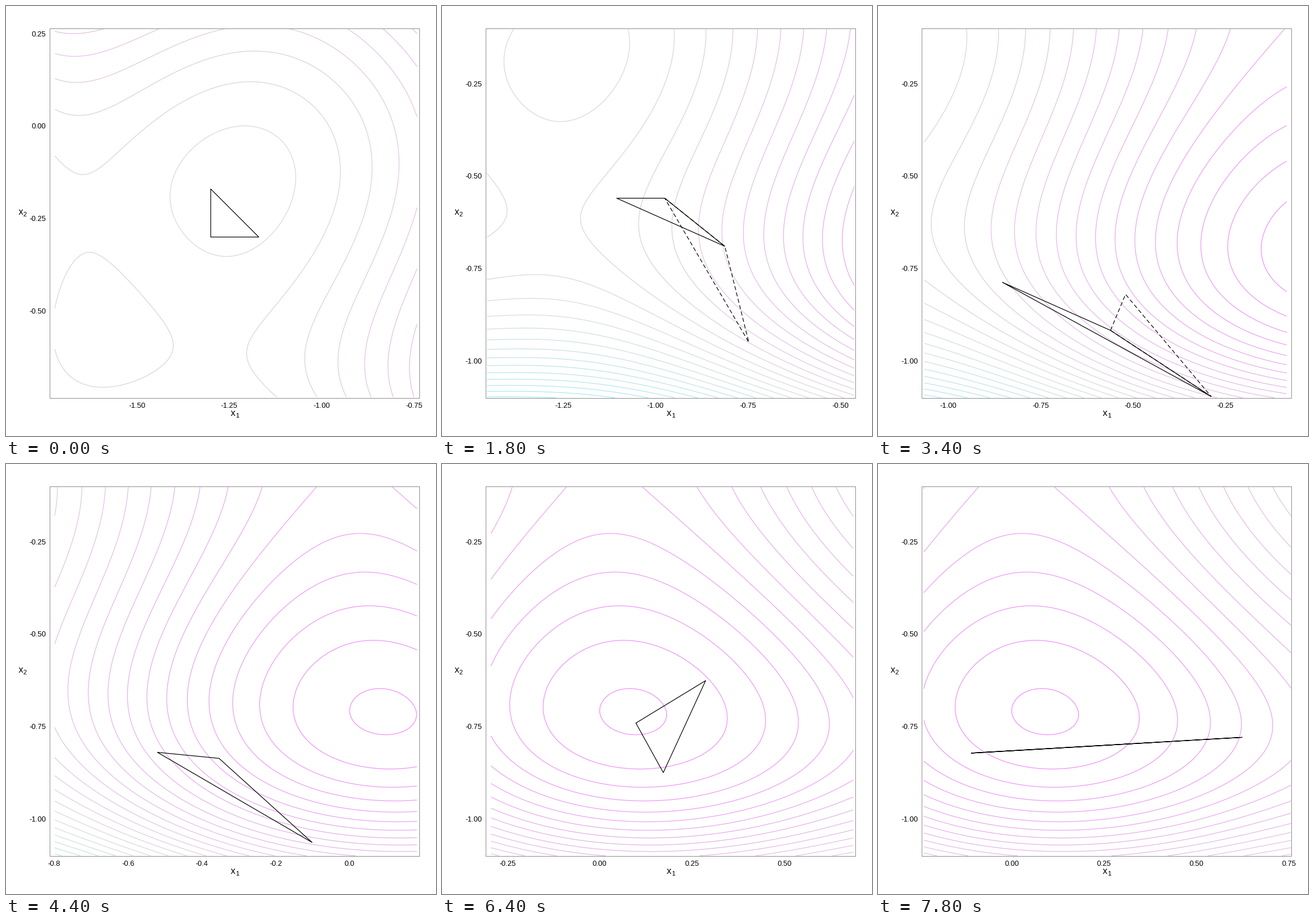
Animation, 748 px wide and 748 px high, one loop 8 s. Source, as a matplotlib script:

```python
import math

import matplotlib.pyplot as plt
import numpy as np
from matplotlib.animation import FuncAnimation

SIZE, DPI = 748, 100
PX = 72 / DPI                       # one pixel in points
LEFT, RIGHT, TOP, BOTTOM = 76.45, 719.4, 38.6, 681.6
FRAMES, INTERVAL = 40, 200
plt.rcParams["font.family"] = "Liberation Sans"


def camel(x, y):
    """Six-hump camel function."""
    return 4 * x**2 - 2.1 * x**4 + x**6 / 3 + x * y - 4 * y**2 + 4 * y**4


def nelder_mead(start, count):
    """Return the first `count` points the simplex search evaluates."""
    step = 0.1 * np.abs(start).max()
    simplex = [start, start + [step, 0], start + [0, step]]
    trail = list(simplex)
    vals = [camel(*p) for p in simplex]

    def visit(p):
        trail.append(p)
        return camel(*p)

    while len(trail) < count:
        hi = int(np.argmax(vals))
        low = min(vals)
        mid = (sum(simplex) - simplex[hi]) / 2
        new = 2 * mid - simplex[hi]
        val = visit(new)
        if val < low:
            trial = 2 * new - mid
            trial_val = visit(trial)
            if trial_val < val:
                new, val = trial, trial_val
            simplex[hi], vals[hi] = new, val
        else:
            if val < vals[hi]:
                simplex[hi], vals[hi] = new, val
            trial = (simplex[hi] + mid) / 2
            trial_val = visit(trial)
            if trial_val < vals[hi]:
                simplex[hi], vals[hi] = trial, trial_val
    return np.array(trail[:count])


def nice_breaks(lo, hi, want=5):
    """Extended Wilkinson tick search; returns visible ticks and decimals."""
    best, found = -9, None
    for rank, q in enumerate((1, 5, 2, 2.5, 4, 3)):
        for power in (-2, -1, 0):
            step = q * 10.0**power
            for k in range(2, 13):
                first = math.floor(hi / step) - (k - 1)
                for s in range(first, math.ceil(lo / step) + 1):
                    a, b = s * step, (s + k - 1) * step
                    zero = s <= 0 <= s + k - 1
                    simple = zero - rank / 5
                    cover = 1 - 50 * ((hi - b)**2 + (lo - a)**2) / (hi - lo)**2
                    ratio = (max(b, hi) - min(a, lo)) / (step * (want - 1))
                    dense = 2 - max(ratio, 1 / ratio)
                    score = 0.25 * simple + 0.2 * cover + 0.5 * dense
                    if score > best:
                        best, found = score, (s, k, step)
    s, k, step = found
    ticks = [i * step for i in range(s, s + k) if lo <= i * step <= hi]
    decimals = 1 if abs(step * 10 - round(step * 10)) < 1e-6 else 2
    return ticks, decimals


def level_color(v):
    stops = [-1, 2.6, 4.8, 8.8]
    rgb = [(240, 140, 250), (218, 218, 218), (165, 235, 242), (110, 240, 250)]
    return tuple(np.interp(v, stops, ch) / 255 for ch in zip(*rgb))


trail = nelder_mead(np.array([-1.3, -0.3]), FRAMES // 2 + 3)
gx = np.linspace(-2.1, 2.1, 301)
gy = np.linspace(-1.1, 1.1, 301)
levels = np.arange(-5, 44) / 5
colors = [level_color(v) for v in levels]

fig = plt.figure(figsize=(SIZE / DPI, SIZE / DPI), dpi=DPI, facecolor="white")
ax = fig.add_axes([LEFT / SIZE, 1 - BOTTOM / SIZE,
                   (RIGHT - LEFT) / SIZE, (BOTTOM - TOP) / SIZE])


def label(x, y, text, size, ha="left"):
    ax.text(x / SIZE, 1 - y / SIZE, text, fontsize=size * PX, ha=ha,
            va="baseline", color="black", transform=fig.transFigure)


def inside(grid, lo, hi):
    return grid[(grid >= lo - 1e-9) & (grid <= hi + 1e-9)]


def draw(frame):
    k = frame // 2
    tri = trail[k:k + 3]
    cx, cy = (tri.min(axis=0) + tri.max(axis=0)) / 2
    cy = max(cy, -0.6)
    x0, x1, y0, y1 = cx - 0.5, cx + 0.5, cy - 0.5, cy + 0.5

    ax.clear()
    ax.set(xlim=(x0, x1), ylim=(y0, y1), xticks=[], yticks=[])
    for spine in ax.spines.values():
        spine.set(color="#8f8f8f", linewidth=PX)

    xs, ys = inside(gx, x0, x1), inside(gy, y0, y1)
    ax.contour(xs, ys, camel(xs[None, :], ys[:, None]), levels, colors=colors,
               linewidths=1.2 * PX, linestyles="solid", zorder=1)

    width = 1.2 * PX
    if frame % 2:
        nxt = trail[[k + 1, k + 2, k + 3, k + 1]]
        ax.plot(*nxt.T, color="black", lw=width, ls=(0, (5.9, 3.6)),
                dash_capstyle="butt", zorder=2.1)
    ax.fill(*tri.T, fill=False, ec="black", lw=width, joinstyle="round",
            zorder=2.2)

    ticks, dec = nice_breaks(x0, x1)
    for t in ticks:
        label(LEFT + (t - x0) * (RIGHT - LEFT), 698.6, f"{t:.{dec}f}", 12.8,
              "center")
    ticks, dec = nice_breaks(y0, y1)
    for t in ticks:
        label(69.4, BOTTOM - (t - y0) * (BOTTOM - TOP) + 4.5, f"{t:.{dec}f}",
              12.8, "right")

    for x, y, sub in ((391, 713, "1"), (21.5, 363, "2")):
        label(x, y, "x", 16)
        label(x + 8, y + 3, sub, 11.4)
    return []


anim = FuncAnimation(fig, draw, frames=FRAMES, interval=INTERVAL,
                     init_func=lambda: draw(0), repeat=True, repeat_delay=0)
plt.show()
```
